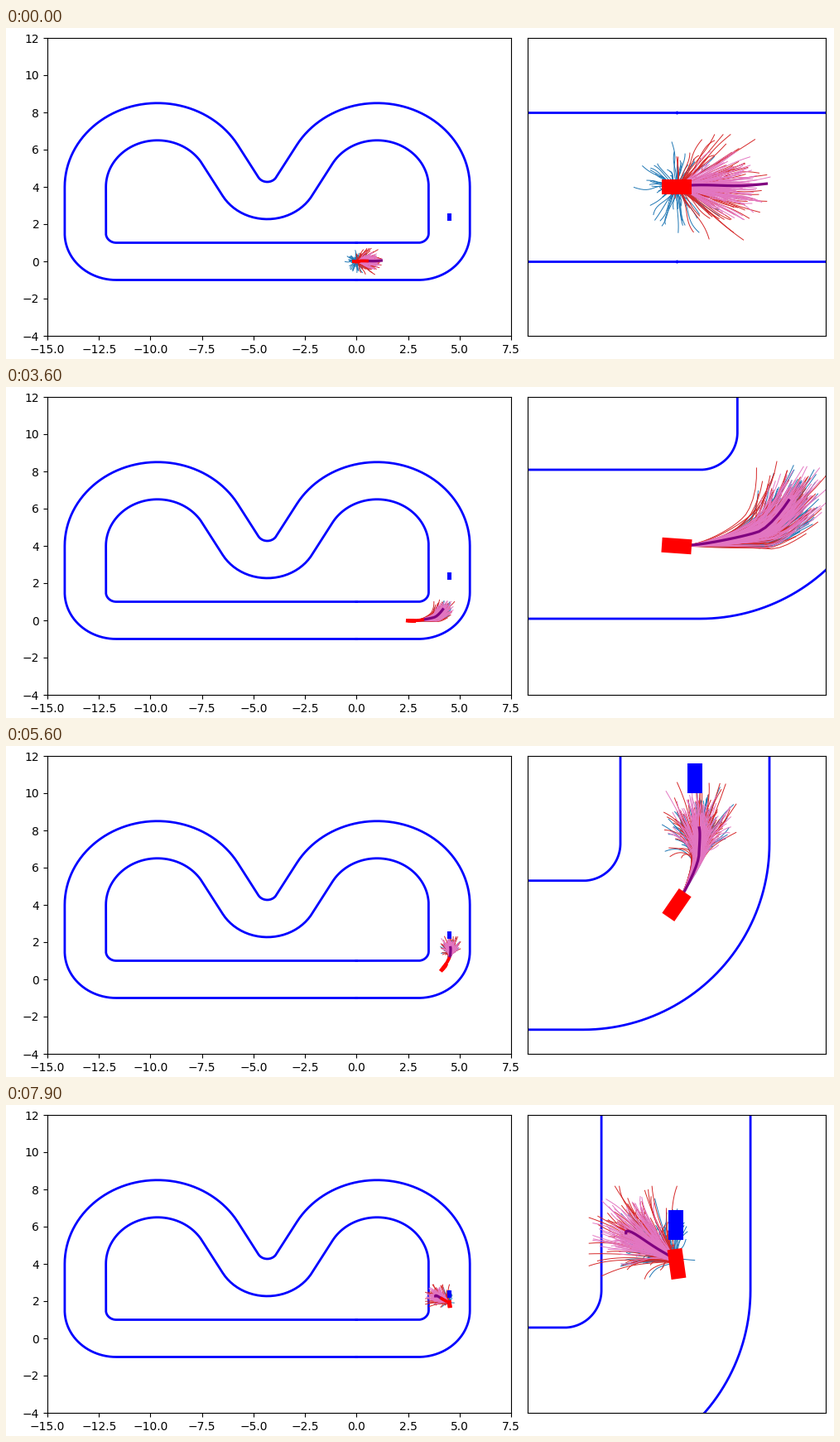
Recreate the animation shown at these times as a matplotlib script. Size 1000 px wide and 400 px high, loop 8 s.

```python
import numpy as np
import matplotlib.pyplot as plt
from matplotlib.animation import FuncAnimation
from matplotlib.collections import LineCollection
from matplotlib.patches import Polygon, Rectangle

FRAMES, STEP = 80, 0.1       # step in seconds
HORIZON = 1.9                # how far ahead a plan looks, in seconds
OBSTACLE = (4.5, 2.378)

# Waypoints: time, x, y, heading in degrees; the last one is only planned for
WAYPOINTS = np.array([
    (0.0, 0, 0, 0), (1.4, 0.71, -0.005, 2), (2.4, 1.573, -0.015, 2),
    (3.6, 2.685, -0.022, -4), (4.9, 3.79, 0.172, 27), (5.4, 4.15, 0.505, 47),
    (6.4, 4.54, 1.367, 85), (7.9, 4.51, 1.856, 98), (9.8, 3.75, 2.2, 150),
])

# Sampled rollouts: colour, count, spread, extra spread and lag when slow
SAMPLERS = [("#1f77b4", 100, 0.21, 0.06, 1.1),
            ("#d62728", 110, 0.22, 0.09, 0.6),
            ("#e377c2", 130, 0.19, 0.02, 0.35)]


def track_edge(side):
    """Walk the course as (length, turn, radius) and shift it sideways."""
    half = [(3, 0, 0), (0, 90, 1.5), (2.5, 0, 0), (0, 150, 3.5), (2, 0, 0)]
    course = half + [(0, -120, 1.5)] + half[:0:-1] + [(11.66, 0, 0)]
    pos, head = np.zeros(2), 0.0
    pts = [pos + (0, side)]
    for length, turn, radius in course:
        if turn:
            sign = np.sign(turn)
            angles = head + np.radians(np.linspace(0, turn, 50))
            normals = np.c_[-np.sin(angles), np.cos(angles)]
            centre = pos + sign * radius * normals[0]
            line = centre - sign * radius * normals
            pts.extend(line + side * normals)
            pos, head = line[-1], angles[-1]
        else:
            normal = np.array([-np.sin(head), np.cos(head)])
            pos = pos + length * np.array([np.cos(head), np.sin(head)])
            pts.append(pos + side * normal)
    return np.array(pts)


def waypoint_slopes():
    """Harmonic-mean slopes: no overshoot, at rest at both ends."""
    d = np.diff(WAYPOINTS[:, 1:], axis=0) / np.diff(WAYPOINTS[:, :1], axis=0)
    a, b = d[:-1], d[1:]
    same = a * b > 0
    slopes = np.zeros((len(WAYPOINTS), 3))
    slopes[1:-1] = np.where(same, 2 * a * b / np.where(same, a + b, 1), 0)
    return slopes


SLOPES = waypoint_slopes()


def pose(t):
    """x, y and heading at one time or an array of times."""
    times, vals = WAYPOINTS[:, 0], WAYPOINTS[:, 1:]
    i = np.clip(np.searchsorted(times, t, "right") - 1, 0, len(times) - 2)
    h = (times[i + 1] - times[i])[..., None]
    u = (t - times[i])[..., None] / h
    return ((1 + 2 * u) * (1 - u) ** 2 * vals[i]
            + u * (1 - u) ** 2 * h * SLOPES[i]
            + u * u * (3 - 2 * u) * vals[i + 1]
            + u * u * (u - 1) * h * SLOPES[i + 1])


def car_corners(x, y, heading):
    a = np.radians(heading)
    box = np.array([(-0.2, -0.1), (0.2, -0.1), (0.2, 0.1), (-0.2, 0.1)])
    turn = np.array([(np.cos(a), np.sin(a)), (-np.sin(a), np.cos(a))])
    return box @ turn + (x, y)


def rollouts(frame):
    """The chosen plan and the sampled fans, relative to the car."""
    rng = np.random.default_rng(100 + frame)
    t = frame * STEP
    s = np.linspace(0, 1, 18)[:, None]
    plan = pose(t + HORIZON * s[:, 0])[:, :2] - pose(t)[:2]
    velocity = (pose(t + 0.01)[:2] - pose(t)[:2]) / 0.01
    pace = min(np.hypot(*velocity), np.hypot(*plan[-1]) / HORIZON)
    slow = max(0, 1 - pace / 0.6)

    # a slow car fans out in straight rays, a fast one along the plan
    base = plan + slow * (s * plan[-1] - plan)
    drift = 1.3 * slow * velocity * s
    fans = []
    for _, n, spread, extra, lag in SAMPLERS:
        ends = np.clip(rng.normal(0, 1, (n, 1, 2)), -2.3, 2.3)
        wave = rng.normal(0, 0.025, (n, 1, 2)) * np.sin(2 * np.pi * s) * s
        fans.append(base * (1.04 - lag * slow) + drift + wave
                    + ends * (spread + extra * slow) * s ** (1.8 - 0.7 * slow))
    sway = rng.normal(0, 0.04, (2, 2))
    return plan + sway[0] * s + sway[1] * s * np.sin(2 * np.pi * s), fans


fig = plt.figure(figsize=(10, 4), dpi=100)
wide = fig.add_axes([0.05, 0.07, 0.56, 0.9])
near = fig.add_axes([0.63, 0.07, 0.36, 0.9])
wide.set(xlim=(-15, 7.5), ylim=(-4, 12), xticks=np.arange(-15, 7.6, 2.5))
near.set(xticks=[], yticks=[])

views = []
for ax in (wide, near):
    for side in (-1, 1):
        ax.plot(*track_edge(side).T, color="blue", lw=2, zorder=1)
    fans = [LineCollection([], colors=sampler[0], linewidths=0.7, zorder=2)
            for sampler in SAMPLERS]
    for lines in fans:
        ax.add_collection(lines, autolim=False)
    best, = ax.plot([], [], color="purple", lw=2.3, zorder=5)
    car = Polygon(np.zeros((4, 2)), fc="red", ec="none", zorder=7)
    ax.add_patch(car)
    ox, oy = OBSTACLE
    ax.add_patch(Rectangle((ox - 0.1, oy - 0.2), 0.2, 0.4,
                           fc="blue", ec="none", zorder=8))
    views.append((fans, best, car))

near.plot([0, 0], [-1, 1], "|", color="blue", ms=2.4, mew=1, zorder=1)
trail = Polygon(np.zeros((4, 2)), fc="red", ec="none", zorder=6)
wide.add_patch(trail)
lead, = wide.plot([], [], color="red", lw=2.7, zorder=6,
                  solid_capstyle="butt")


def update(frame):
    now = pose(frame * STEP)
    here = now[:2]
    plan, samples = rollouts(frame)
    for fans, best, car in views:
        for lines, paths in zip(fans, samples):
            lines.set_segments(paths + here)
        best.set_data(*(plan + here).T)
        car.set_xy(car_corners(*now))
    trail.set_xy(car_corners(*pose(max(frame - 1, 0) * STEP)))
    close = plan[np.hypot(*plan.T) < 0.6]
    lead.set_data(*(close + here).T)
    near.set_xlim(here[0] - 2, here[0] + 2)
    near.set_ylim(here[1] - 2, here[1] + 2)
    return []


anim = FuncAnimation(fig, update, frames=FRAMES, interval=1000 * STEP,
                     init_func=lambda: update(0), repeat=True, repeat_delay=0)
plt.show()
```
